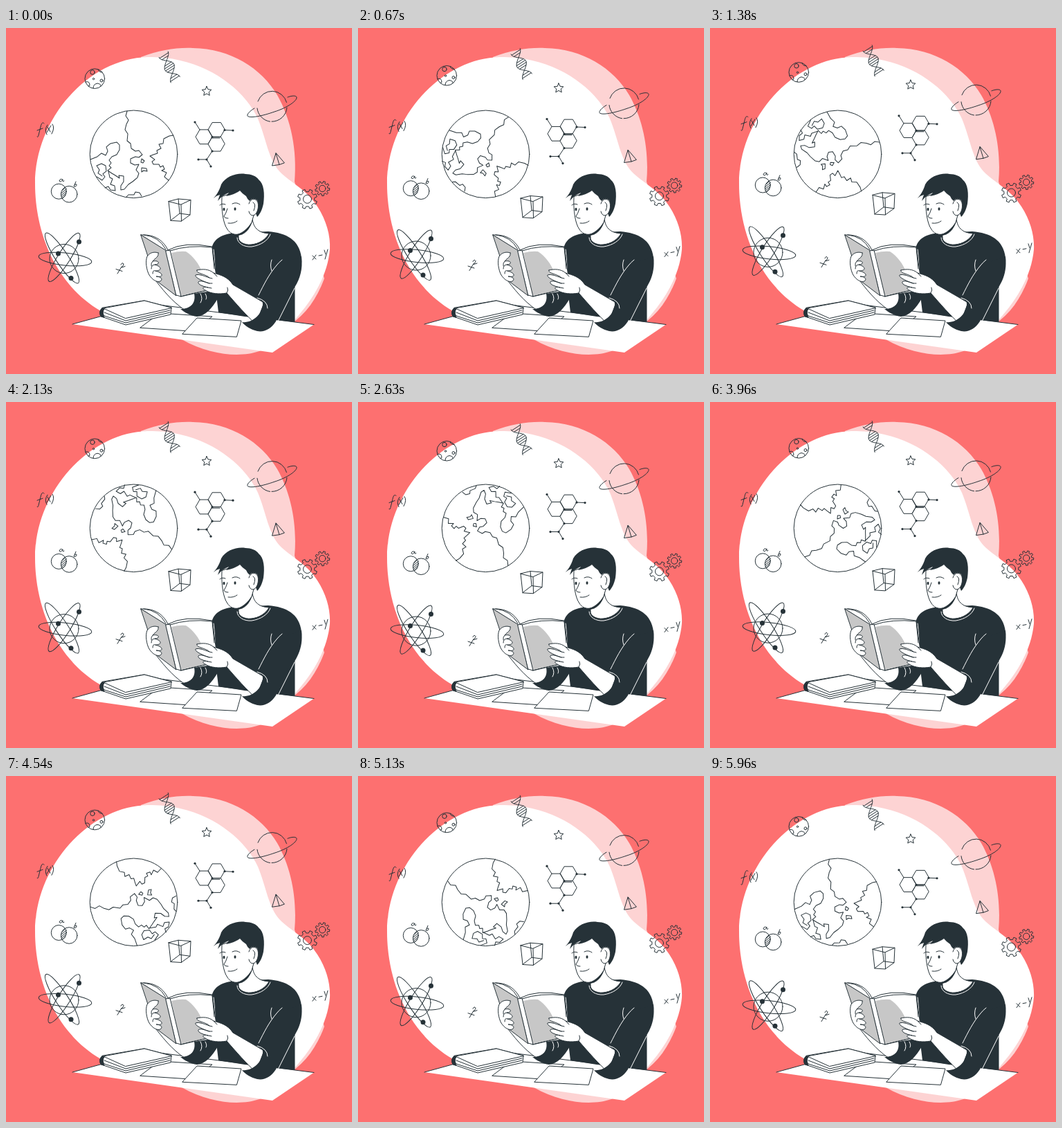
Write an HTML page that moves like this. It is 500 by 500 pixels and loops after 6000 ms.

```html
<!DOCTYPE html>
<html lang="en">
<head>
<meta charset="utf-8">
<title>Reading about science</title>
<style>
  html, body { margin: 0; width: 100%; height: 100%; overflow: hidden; background: #fd7070; }
  svg { display: block; width: 100vw; height: 100vh; stroke-linecap: round; stroke-linejoin: round; }
  .line { fill: none; stroke: #263238; stroke-width: 1; }
  .paper { fill: #fff; stroke: #263238; stroke-width: 1; }
  .dark { fill: #263238; stroke: none; }
  .gray { fill: #c7c7c7; stroke: #263238; stroke-width: 1; }
  .crease { fill: none; stroke: #fff; stroke-width: 1; }
</style>
</head>
<body>
<svg viewBox="0 0 500 500">
  <!-- backdrop -->
  <path fill="#fdd3d3" d="M195 42C222 32 246 28 270 29C325 30 369 58 392 97C412 132 421 177 417 222L440 300L460 362C449 392 433 413 412 428C402 445 388 460 366 467C340 476 296 474 254 450L200 300Z"/>
  <path fill="#fff" d="M42 225C42 132 118 44 205 42C221 42 237 43 252 47C305 59 347 94 364 131C376 160 379 190 396 208C412 224 435 234 450 258C463 278 469 300 468 320C465 355 446 390 417 422L240 446L137 409C72 371 42 296 42 225Z"/>

  <!-- table -->
  <path fill="#fff" d="M96 428L205 398L445 428.5L385 469Z"/>
  <path class="line" d="M96 428L205 398L445 428.5"/>
  <g class="paper">
    <path d="M194 433L222 412L298 417L270 438Z"/>
    <path d="M255 442L276 419L340 423L333.500 446Z"/>
    <path d="M139 404.500Q133 411 138 417L173 429L238 414L239 404L200 394Z"/>
    <path d="M141 405L200 394L240 404.500L173 419.500Z"/>
    <path class="line" d="M142 405.500Q138 411 142 416L173 426L237 411M142 411L173 423L237 408"/>
    <path class="dark" d="M139 404Q132 410 137 417.500L143 419Q138 411 143 405Z"/>
  </g>

  <!-- body -->
  <path class="dark" d="M334 296C312 297 299 305 297 320L303 378L307 411L345 417L417.500 425V374C425 362 429 348 427 332C424 306 405 296 379 294Z"/>
  <path class="paper" d="M336 292V302C335 309 345 314 354 313C366 312 376 305 380 297C367 296 357 291 356 274L338 278Z"/>
  <path class="crease" d="M334 303C334 311 344 317 355 316C368 314 379 307 382 298M300 320Q302 338 302 350"/>
  <path class="paper" d="M214 362C224 375 239 395 259 408L279 394L272 382L240 366Z"/>
  <path class="dark" d="M272 384L304 379L306 391C298 405 288 416 276 417C267 416 258 411 252 406C265 406 275 399 272 384Z"/>
  <path class="crease" d="M281 384Q285 391 281 397M288 384Q291 389 289 392"/>

  <!-- open book -->
  <path class="paper" d="M195 299C211 298 226 304 234 321Q258 308 298 316L306 374L252 388L232 323Z"/>
  <path class="gray" d="M195 299L232 322L246 387L217 365Z"/>
  <path fill="#c7c7c7" d="M239 325Q251 322 260 323C270 329 279 341 283 352L288 379L252 387Z"/>
  <path class="paper" d="M231 322L237 321L253 388L246 386Z"/>
  <path class="line" d="M237 322Q263 313 298 317L301 348M199 299Q221 301 231 320M253 388L292 379"/>

  <!-- hands -->
  <path class="paper" d="M220 325C215 323 208 324 204 330C201 337 203 350 207 357C211 363 217 368 223 366C228 362 222 359 217 359C228 361 228 354 216 351C225 351 226 345 215 342C223 342 222 335 212 337C216 332 221 331 220 325Z"/>
  <path class="line" d="M212 337Q209 340 210 344M215 342Q210 342 210 348M216 351Q212 349 212 355"/>
  <path class="paper" d="M276 350C284 348 293 348 300 354C310 357 320 359 328 371L373 397L361 428C347 415 333 399 319 383C308 385 296 384 288 379C282 376 285 373 292 375C282 373 275 369 279 366C284 365 289 368 294 369C284 366 272 360 274 357C279 355 288 359 294 361C288 355 274 355 276 350Z"/>
  <path class="line" d="M294 361L298 362M294 369L298 369M292 375L297 376M300 354L305 359M319 383Q322 379 320 375"/>
  <path class="dark" d="M427 330C429 350 418 369 407 385L390 424C383 435 373 440 363 438C354 436 346 431 341 425C356 427 371 413 371 399C371 394 368 391 362 390L385 345Z"/>
  <path class="crease" d="M363 390Q378 394 378 405M365 386C373 370 380 356 391 343Q395 338 399 335M384 335Q381 343 384 351M417 376L393 424"/>

  <!-- head -->
  <path class="paper" d="M312 244C311 264 314 283 320 291C325 299 335 301 345 294Q354 288 357 274L366 250L344 232Z"/>
  <path class="dark" d="M330 299Q345 297 356 279C353 291 344 300 334 300Z"/>
  <path class="dark" d="M300 246C306 239 309 233 311 226C318 214 334 209 346 211C354 211 362 214 365 219C373 225 374 240 372 254C370 263 367 269 363 273L361 268Q366 258 363 249Q357 244 352 250Q349 248 347 243Q341 239 338 235Q332 240 318 243L322 238Q313 241 306 250L309 241Q304 242 300 246Z"/>
  <path class="paper" d="M351 254C353 246 361 245 364 252C366 261 362 271 356 271Q352 270 351 265"/>
  <path class="line" d="M357 252Q362 254 358 264M309 256Q312 253 317 255M327 254Q333 251 338 255M320 261Q318 268 315 272Q316 275 321 275M321 282Q329 283 334 279"/>
  <ellipse class="dark" cx="315" cy="262" rx="1.5" ry="2.3"/>
  <ellipse class="dark" cx="331" cy="261.5" rx="1.5" ry="2.3"/>

  <!-- globe -->
  <circle class="line" cx="184.5" cy="182.3" r="63.3"/>
  <g id="globe" class="line">
    <path d="M175 120L173 127L177 133L174 139L172 147L176 153L175 163L180 167L181 174L187 178L192 177L197 183L192 187L187 186L180 189V195L186 198L192 197L188 205L192 210L190 216L183 222L177 226L171 233L166 234V228L170 222V214L163 213L164 217L158 213L153 210L147 206L152 202L149 199L152 195L149 191L153 186L160 183L164 176V169L160 165L151 167L145 172L147 178L144 184L138 181L132 186L122 190"/>
    <path d="M131 199L138 196L144 199L145 207L140 211L143 215L139 220L131 215M131 199L135 205L133 210L139 214M148 207L150 216L154 218L151 226L157 228L158 235L151 234L148 229L143 231"/>
    <path d="M242 155L236 156L228 160L227 167L221 168L224 174L218 177L219 181L213 183L208 185L215 190L211 193L213 197L221 197L223 201L227 199L229 204L225 206L232 209L229 215L235 220"/>
    <path d="M196 189L200 192L198 195L195 194ZM196 202L203 203L204 207L199 206L196 208Z"/>
    <path d="M174 244L177 241L185 241L187 237L193 238L196 243"/>
  </g>

  <g id="floaters" class="line">
    <!-- moon -->
    <circle cx="128.3" cy="73.2" r="14.3"/>
    <circle cx="125" cy="64" r="3.2"/><circle cx="138" cy="76" r="2"/><circle cx="126.5" cy="73.5" r="1.2"/>
    <path d="M115 78Q121 76 121 83L119 84M126 87Q126 81 132 80Q138 81 137 84M133 60Q134 64 139 64"/>
    <path id="dna"/>
    <path id="star"/>
    <!-- ringed planet -->
    <path d="M364 106A21.7 21.7 0 0 1 405.500 107.500M406 115A21.7 21.7 0 0 1 384 135.200M381.500 135.200A21.7 21.7 0 0 1 363 116"/>
    <path d="M359 116C352 120 348 125 349 127C352 131 371 127 388 121C407 115 421 105 420 100C419 97 412 98 407 100"/>
    <!-- molecule -->
    <path id="cells"/>
    <path d="M280 147L273 136M316 147.500L328 148M298 178L290 190L278 190M290 190L296 200M298 159L309 159"/>
    <g class="dark" id="nodes"></g>
    <!-- formulas -->
    <path d="M55 138C53 135 51 138 50 143L47 155Q46 159 45 157M45 148L53 145M60 140Q55 147 59 154M60 143L64 150M65 141L59 151M67 139Q71 144 66 153"/>
    <path d="M159 348.500L168 351.500M167 345L161 355M166 342Q168 338 170 341Q170 343 167 346L172 344.500"/>
    <path d="M443 329L448 334M448 328L443 335M452 329L457 328M460 321L462 327M465 320L461 334"/>
    <!-- overlapping sets -->
    <circle cx="76.3" cy="236.2" r="11"/><circle cx="91.2" cy="240.2" r="11.8"/>
    <path d="M81 235L86 230.500M79.500 239L87.500 232.500M79.500 242L87.500 235.500M80 244.500L87 238.500M82 246L86 242"/>
    <path d="M82 219Q78 217 77 221Q79 224 82 219Q81 223 84 221M101 222L98 229Q102 230 102 226Q100 225 99 227"/>
    <!-- solids -->
    <path d="M390 181L384.500 199L395 197.500L402 195ZM390 181L395 197.500"/>
    <path d="M235 250.500L249 247L267 248.500L253 255ZM238 278L251 268L266 270L253.500 279ZM235 250.500L238 278M249 247L251 268M267 248.500L266 270M253 255L253.500 279"/>
    <path id="gears"/>
    <circle cx="435.5" cy="247.3" r="6"/><circle cx="457.2" cy="232" r="4.7"/>
    <!-- atom -->
    <circle cx="84" cy="333.500" r="21"/>
    <ellipse cx="85.500" cy="334" rx="38.500" ry="9" transform="rotate(6 85.500 334)"/>
    <ellipse cx="81" cy="332.500" rx="43" ry="9" transform="rotate(57 81 332.500)"/>
    <ellipse cx="84" cy="331.500" rx="41" ry="9" transform="rotate(-58 84 331.500)"/>
    <g class="dark"><circle cx="105.500" cy="309" r="3.5"/><circle cx="75.500" cy="326" r="3.5"/><circle cx="94" cy="361.500" r="3.5"/></g>
  </g>
</svg>
<script>
const LOOP = 6000, BOB = 3000, LIFT = 10, TAU = 2 * Math.PI;
const el = id => document.getElementById(id);
const polar = (x, y, r, a) => [x + r * Math.cos(a), y + r * Math.sin(a)];
const toPath = pts => 'M' + pts.map(p => p.map(v => v.toFixed(2)).join(' ')).join('L');
const range = (n, f) => Array.from({ length: n }, (_, i) => f(i));

// Both strands follow a cosine around a tilted axis.
function strand(s, side) {
  const w = side * Math.cos(TAU * s);
  return [227.7 + 17 * s + 6.5 * w, 38.2 + 36.5 * s - 4.2 * w];
}
const strands = [-1, 1].map(side => toPath(range(41, i => strand(i / 40, side))));
const rungs = [.04, .13, .38, .46, .54, .62, .87, .96]
  .map(s => toPath([strand(s, -1), strand(s, 1)]));
el('dna').setAttribute('d', strands.concat(rungs).join(''));

el('star').setAttribute('d', toPath(range(10, i =>
  polar(290, 91.5, i % 2 ? 3.4 : 7.2, i * TAU / 10 - TAU / 4))) + 'Z');

const hexagon = (x, y) => toPath(range(6, i => polar(x, y, 12, i * TAU / 6))) + 'Z';
el('cells').setAttribute('d', hexagon(304, 147) + hexagon(286, 157.3) + hexagon(304, 167.7));
el('nodes').innerHTML = [[273, 136], [316, 147.5], [328, 148], [298, 157.5], [298, 178],
  [278, 190], [290, 190], [296, 200]]
  .map(([x, y]) => `<circle cx="${x}" cy="${y}" r="1.6"/>`).join('');

function gear(x, y, outer, inner, teeth, turn) {
  const edges = [[inner, -.27], [outer, -.19], [outer, .19], [inner, .27]];
  return toPath(range(teeth * 4, i => {
    const [r, shift] = edges[i % 4];
    return polar(x, y, r, turn + (Math.floor(i / 4) + shift) * TAU / teeth);
  })) + 'Z';
}
el('gears').setAttribute('d',
  gear(435.5, 247.3, 14.3, 10.8, 8, .39) + gear(457.2, 232, 10.6, 8, 9, .1));

function draw(now) {
  const t = now % LOOP;
  const phase = t % BOB / BOB;
  const lift = LIFT * (1 - Math.abs(1 - 2 * phase));
  el('floaters').setAttribute('transform', `translate(0 ${-lift})`);
  el('globe').setAttribute('transform', `rotate(${360 * t / LOOP} 184.5 182.3)`);
  requestAnimationFrame(draw);
}
draw(performance.now());
</script>
</body>
</html>
```
